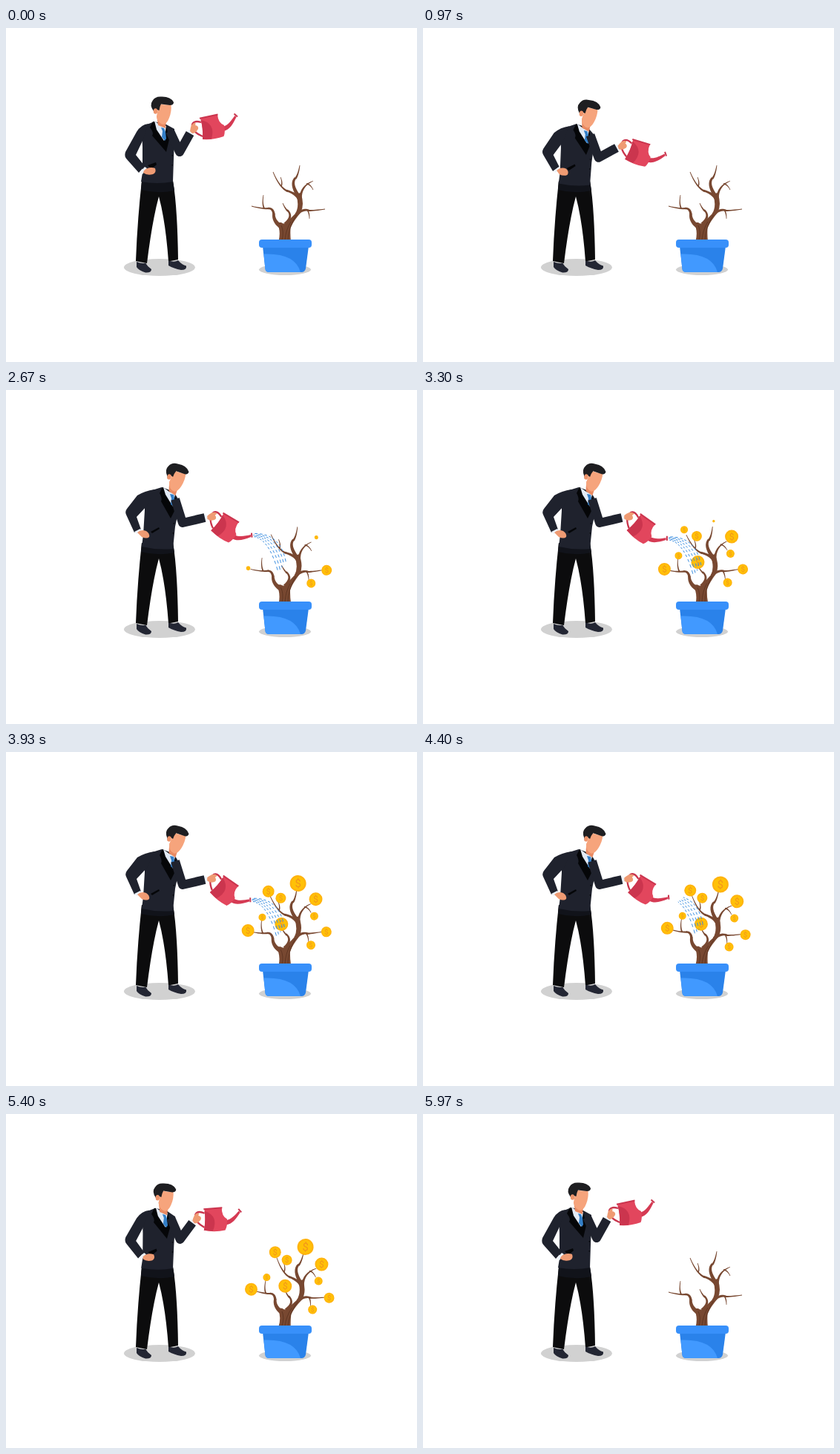
An HTML page that plays this animation: 554 by 450 pixels, repeating every 6.01 s.

```html
<!DOCTYPE html>
<html lang="en">
<head>
<meta charset="utf-8">
<title>Watering the money tree</title>
<style>
html, body { margin: 0; width: 100%; height: 100%; overflow: hidden; background: #fff; }
svg { display: block; width: 554px; height: 450px; }
</style>
</head>
<body>
<svg viewBox="0 0 554 450" xmlns="http://www.w3.org/2000/svg">
  <ellipse cx="207" cy="322.5" rx="48" ry="11.5" fill="#d1d1d1"/>
  <ellipse cx="376" cy="325.5" rx="35" ry="7.5" fill="#d1d1d1"/>

  <g id="tree">
    <g id="limbs" fill="#784831">
      <path d="M367.5 287Q371 273 365 262L371 262Q376 266 380 260L390 250Q396 240 391 224L397 222Q403 238 397 249Q386 262 383.5 270Q383 280 384 287Z"/>
      <path d="M372 286Q375 274 371 266M376 286Q377 272 384 261M380 286Q380 270 393 249" fill="none" stroke="#59321f" stroke-width=".8"/>
    </g>
    <g id="coins"></g>
  </g>

  <g id="pot">
    <path d="M346 294H408L404 324Q403 329 398 329H355Q350 329 349.500 325Z" fill="#2a82ea"/>
    <path d="M347.500 304.500Q390 303 397 329H355Q350 329 349.500 325Z" fill="#4199ff"/>
    <rect x="341" y="285" width="71" height="11" rx="4" fill="#3890fa"/>
  </g>

  <g id="legs">
    <path d="M183 206H225Q231 240 232 312L219 314.500Q215 260 206 227Q197 260 190 317L175 314Q177 260 183 206Z" fill="#0c0c0d"/>
    <path d="M183 206H225L227 219Q205 224 182 218Z" fill="#11131a"/>
    <g fill="#232633">
      <path d="M176 315Q183 318 188 316.500Q191 322 196 325Q196 330 188 329.500Q179 327 176 322Z"/>
      <path d="M219 313.500Q227 316 232 313Q237 319 243 320.500Q244 326 236 326Q226 324 219 320Z"/>
    </g>
  </g>

  <g id="body"></g>

  <g id="head">
    <path d="M203 118L216 124L215 135L205 131Z" fill="#e98a62"/>
    <path d="M206 102Q214 104 222.500 103.500Q223.500 112 220 121Q217 129 212 130Q204 128 203 119Z" fill="#f6a47c"/>
    <path d="M199 112Q193 104 197.500 98Q201 92 209 92.500Q222 92 226 100Q226 104 221 104L209 102.500Q207 106 206.500 111L203 110L200 115Z" fill="#1e1e21"/>
    <ellipse cx="201.500" cy="112" rx="2.700" ry="3.700" fill="#ee946b"/>
  </g>

  <g id="arm" fill="none" stroke-linejoin="round">
    <path id="cuff" stroke="#eef4fc" stroke-width="8"/>
    <path id="sleeve" stroke="#1f222d" stroke-width="12"/>
  </g>

  <g id="can">
    <path d="M263 127Q253 124 251 130Q250 140 265 146" fill="none" stroke="#c9354d" stroke-width="2.300"/>
    <path d="M292 133C300 131 304 124 308.500 118L310.500 120C306 129 302 137 293 139Z" fill="#d53a53"/>
    <path d="M307.500 115.500L312 119.500" stroke="#c9354d" stroke-width="2"/>
    <path d="M262 121.500L285 116.500Q286 128 294 131Q296 140 293.500 146Q280 151 265 150Q266 135 262 121.500Z" fill="#e2465d"/>
    <path d="M262.500 124Q283 128 277 149.500L265 150Q266 135 262.500 124Z" fill="#cb354e"/>
    <path d="M261 121.700L285.500 116.500" stroke="#cb354e" stroke-width="2"/>
    <path d="M248 139Q249 128 255 127.500Q256 129 255 131Q260 132 259 136Q256 142 251 142Z" fill="#ef9b73"/>
  </g>

  <path id="water" fill="none" stroke="#3d8fe0" stroke-width="1"/>
</svg>

<script>
const LOOP = 6010;
const byId = id => document.getElementById(id);
const lerp = (a, b, k) => a + (b - a) * k;
const clamp = k => Math.max(0, Math.min(1, k));
const ramp = (t, from, to) => clamp((t - from) / (to - from));
const ease = (t, from, to) => { const k = ramp(t, from, to); return k * k * (3 - 2 * k); };

function add(parent, tag, attrs) {
  const node = document.createElementNS('http://www.w3.org/2000/svg', tag);
  for (const name in attrs) node.setAttribute(name, attrs[name]);
  return parent.appendChild(node);
}

// Blends two paths that share the same commands.
function blend(a, b, k) {
  const goal = b.match(/[\d.]+/g);
  let i = 0;
  return a.replace(/[\d.]+/g, n => lerp(+n, +goal[i++], k).toFixed(2));
}

// Upper body: upright pose, leaning pose, paint.
const bodyParts = [
  ['M200 126L190 130Q182 140 184 160L184 195L182 207Q204 211 225 207L226 176L227 150L227 136L216 130Z',
   'M210 131L197 135Q186 142 187 162L185 195L183 211Q204 216 225 214L228 184L232 165L234 150L226 137Z', '#1f222d'],
  ['M198 126L194 134Q200 142 197 145L216 167L220 150L216 131Z',
   'M211 131L207 139Q211 146 209 150L222 173L231 155L227 139Z', '#050608'],
  ['M200 125L203 137L213 152L216 132L208 131Z',
   'M212 131L215 141L225 157L228 140L220 137Z', '#e3ebf6'],
  ['M209 134L213 135L215 140L216 149L214 152L210 147L211 139Z',
   'M221 140L226 141L227 146L229 155L227 158L222 154L223 146Z', '#337fc8'],
  ['M192 129Q182 130 176 140L161 167Q159 173 163 177L179 195L187 186L175 171L184 152Z',
   'M200 134Q187 136 177 142L163 160Q160 164 162 168L173 192L182 188L176 171L190 156Z', '#1f222d'],
  ['M191 185L202 181L203 184L196 190Z', 'M195 191L206 185L207 187L197 193Z', '#050608'],
  ['M180 195L187 187L190 189L184 197Z', 'M173 191L181 187L183 189L176 194Z', '#eef4fc'],
  ['M186 192Q193 186 201 189Q203 195 198 197Q190 199 185 195Z',
   'M177 192Q182 187 189 190Q194 193 193 198Q190 201 183 198Z', '#ef9b73'],
  ['M223.500 171L225 171L225 172.500L223.500 172.500Z', 'M225.500 179L227 179L227 180.500L225.500 180.500Z', '#090a0e'],
  ['M223.500 184L225 184L225 185.500L223.500 185.500Z', 'M224.500 192L226 192L226 193.500L224.500 193.500Z', '#090a0e']
].map(([upright, leaning, fill]) => ({ upright, leaning, node: add(byId('body'), 'path', { fill }) }));

function quad(p0, p1, p2, u) {
  const v = 1 - u;
  return v * v * p0 + 2 * u * v * p1 + u * u * p2;
}

// Tapered branch along a quadratic curve.
function limb(x0, y0, cx, cy, x1, y1, w0, w1) {
  const left = [], right = [];
  for (let i = 0; i <= 8; i++) {
    const u = i / 8, half = lerp(w0, w1, u) / 2;
    const x = quad(x0, cx, x1, u), y = quad(y0, cy, y1, u);
    const a = Math.atan2(lerp(cy - y0, y1 - cy, u), lerp(cx - x0, x1 - cx, u));
    const nx = -Math.sin(a) * half, ny = Math.cos(a) * half;
    left.push([x + nx, y + ny]);
    right.unshift([x - nx, y - ny]);
  }
  add(byId('limbs'), 'path', { d: 'M' + left.concat(right).join('L') + 'Z' });
}
limb(370, 267, 360, 260, 361, 250, 6, 3.5);
limb(361, 251, 360, 243, 354, 243, 3.5, 2.3);
limb(355, 243, 346, 244, 331, 240, 2.4, .8);
limb(348, 243, 345, 237, 347, 225, 2, .7);
limb(376, 264, 388, 254, 379, 245, 4, 2);
limb(380, 247, 376, 243, 373, 236, 2.2, .7);
limb(396, 233, 394, 224, 378, 219, 5, 2.4);
limb(380, 220, 369, 216, 360, 194, 2.5, .8);
limb(371, 213, 373, 208, 370, 201, 1.8, .7);
limb(394, 226, 383, 210, 390, 202, 5, 2.8);
limb(390, 203, 394, 198, 396, 185, 2.8, .8);
limb(397, 230, 397, 213, 414, 206, 3.6, .8);
limb(405, 210, 410, 210, 414, 218, 2, .7);
limb(391, 251, 401, 243, 409, 246, 4, 2.2);
limb(408, 246, 416, 246, 430, 244, 2.2, .8);
limb(406, 245, 409, 249, 409, 257, 2, .7);

// Coins: x, y, radius, time of appearing.
const coins = [
  [433.5, 244.6, 7, 2130], [412, 261.6, 6, 2230], [328, 238.6, 8.5, 2560], [421, 200, 9, 2570],
  [418, 222.8, 5.5, 2720], [373.5, 231.8, 9, 2830], [348, 221.5, 5, 2930],
  [374, 196.7, 7, 3030], [357.6, 187, 8, 3130], [398, 177.8, 11, 3230]
].map(([x, y, r, start]) => {
  const node = add(byId('coins'), 'g', {});
  add(node, 'circle', { r, fill: '#ffb30f' });
  add(node, 'circle', { r: r * .8, fill: '#ffc107' });
  add(node, 'text', {
    y: r * .47, 'font-size': r * 1.35, 'text-anchor': 'middle', fill: '#f2941d',
    'font-family': 'Roboto, Arial, sans-serif'
  }).textContent = '$';
  return { x, y, start, node };
});

function swayAt(t) {
  if (t < 3600) return -3.5 * ease(t, 1700, 3600);
  if (t < 5000) return lerp(-3.5, 4.8, ease(t, 3600, 5000));
  return 4.8 * (1 - ease(t, 5000, 5970));
}

function waterPath(t, x, y) {
  const front = ramp(t, 1480, 1790), tail = ramp(t, 4330, 4600);
  if (front === 0 || tail === 1) return '';
  let d = '';
  for (let k = 0; k < 5; k++) {
    const at = u => [
      x + quad(1, 38 - 4 * k, 45 - 2.7 * k, u),
      y + quad(k - 2.5, 2 * k - 4, 37 + 3 * k, u)
    ].map(n => n.toFixed(1));
    const flow = (t / 310 + k * .37) % 1 * .2;
    for (let i = -1; i < 10; i++) {
      const u = i * .1 + flow;
      const from = Math.max(u, tail, 0), to = Math.min(u + .055, front);
      if (to > from) d += 'M' + at(from) + 'L' + at(to);
    }
  }
  return d;
}

function render(t) {
  const lean = ease(t, 100, 1550) * (1 - ease(t, 4500, 5700));

  for (const part of bodyParts) part.node.setAttribute('d', blend(part.upright, part.leaning, lean));
  byId('head').setAttribute('transform', `translate(${18.5 * lean} ${7 * lean}) rotate(${12 * lean} 211 111)`);
  byId('sleeve').setAttribute('d', blend('M221 139L234 167L248 142', 'M228 147L238 179L268 172', lean));
  byId('cuff').setAttribute('d', blend('M247 144L250 139', 'M266 172.500L271 171', lean));

  const bob = 3 * Math.cos((t - 1670) / 1900 * 2 * Math.PI) * lean * lean;
  const tilt = 45.5 * lean + bob;
  const handX = 254 + 25 * lean, handY = 134 + 36 * lean;
  byId('can').setAttribute('transform', `translate(${handX} ${handY}) rotate(${tilt}) translate(-254 -134)`);

  const a = tilt * Math.PI / 180;
  const tipX = handX + 57 * Math.cos(a) + 17 * Math.sin(a);
  const tipY = handY + 57 * Math.sin(a) - 17 * Math.cos(a);
  byId('water').setAttribute('d', waterPath(t, tipX, tipY));

  byId('tree').setAttribute('transform', `rotate(${swayAt(t)} 376 285)`);
  for (const { x, y, start, node } of coins) {
    const size = ease(t, start, start + 290) * (1 - ease(t, 5720, 5930));
    node.setAttribute('transform', `translate(${x} ${y}) scale(${size})`);
  }
}

const began = performance.now();
function tick() {
  render((performance.now() - began) % LOOP);
  requestAnimationFrame(tick);
}
tick();
</script>
</body>
</html>
```
